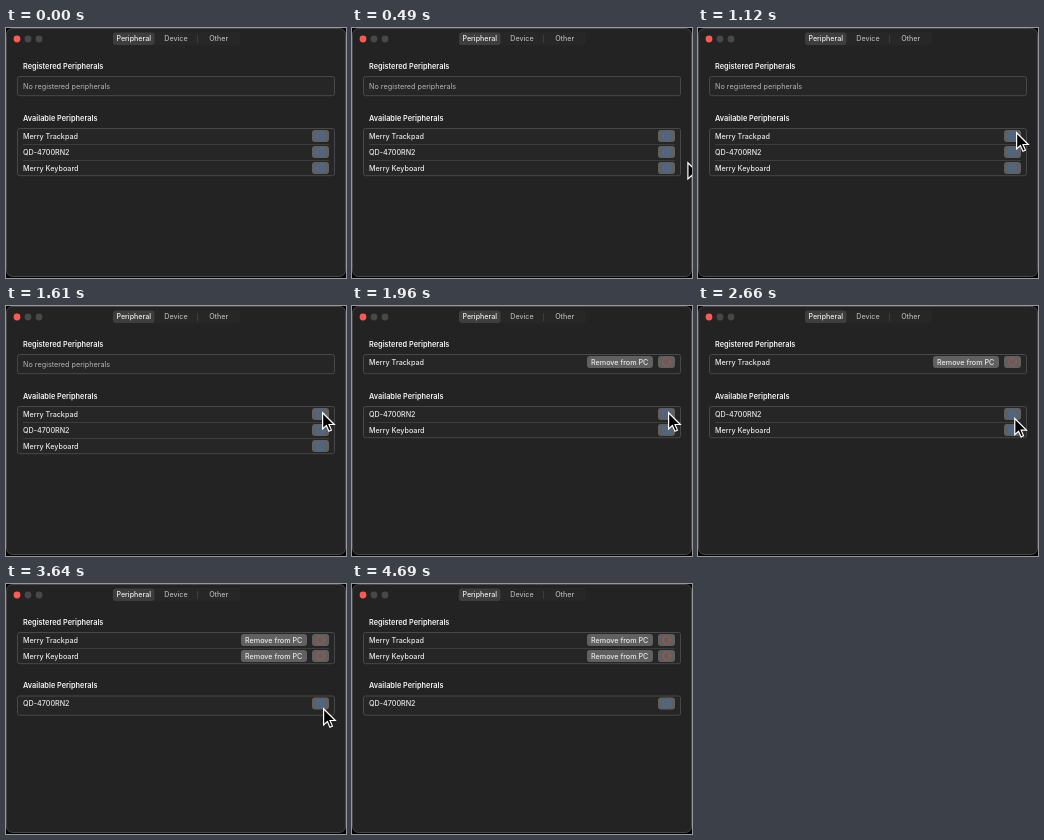
Write an HTML page that moves like this. It is 340 px wide and 250 px high and loops after 5320 ms.

```html
<!DOCTYPE html>
<html lang="en">
<head>
<meta charset="utf-8">
<title>Peripherals</title>
<style>
  html, body { margin: 0; width: 100%; height: 100%; overflow: hidden; background: #000; }
  svg { display: block; width: 340px; height: 250px; }
  text { font: 500 7.2px Inter, "Open Sans", sans-serif; fill: #e8e8e8; }
  .head { font-size: 7.35px; font-weight: 600; fill: #f4f4f4; }
  .dim { font-size: 7.25px; font-weight: 400; fill: #b4b4b4; }
  .tab { font-size: 7.1px; fill: #b4b4b4; text-anchor: middle; }
  .box { fill: #262626; stroke: #484848; }
  .line { stroke: #3d3d3d; }
  .button { fill: #606060; }
  .pressed { fill: #858585; }
</style>
</head>
<body>
<svg viewBox="0 0 340 250">
  <rect x=".5" y=".5" width="339" height="248" rx="6" fill="#232323" stroke="#484848"/>
  <circle cx="11" cy="11" r="3.4" fill="#fb5b51"/>
  <circle cx="22" cy="11" r="3.4" fill="#484848"/>
  <circle cx="33" cy="11" r="3.4" fill="#484848"/>
  <rect x="106.5" y="4" width="127.5" height="13.5" rx="3.5" fill="#272727"/>
  <rect x="107" y="4.5" width="41.5" height="12.5" rx="3" fill="#3e3e3e"/>
  <path d="M191.5 7v8" class="line"/>
  <text x="127.7" y="13.3" class="tab" style="fill:#eee">Peripheral</text>
  <text x="170" y="13.3" class="tab">Device</text>
  <text x="212.7" y="13.3" class="tab">Other</text>
  <g id="lists"></g>
  <path id="cursor" d="M.6.8V17L4.4 13.5 6.9 19.2 9.4 18.1 7 12.5H12.3Z" fill="#000" stroke="#fff" stroke-width="1.2"/>
</svg>
<script>
const LOOP = 5320, STEP = 70, ROW = 16;
const pad = 'Merry Trackpad', phones = 'QD-4700RN2', keys = 'Merry Keyboard';
const lists = document.getElementById('lists');
const cursor = document.getElementById('cursor');

// time, x, y of the pointer tip
const path = [
  [210, 341, 170], [280, 338, 162], [490, 335.3, 134], [560, 335, 132.5],
  [630, 335, 132.5], [1120, 318, 104], [1190, 316, 104], [1260, 315, 104.5],
  [1470, 315, 104.5], [1610, 316, 106], [2450, 316, 106], [3010, 316.5, 124],
  [3080, 317, 124], [4550, 317, 124], [4620, 319, 66.5], [4690, 319, 66.5]
];

const text = (x, y, s, cls = '') => `<text x="${x}" y="${y + 2.6}" class="${cls}">${s}</text>`;
const button = (x, y, w, cls = '') =>
  `<rect x="${x}" y="${y - 6}" width="${w}" height="12" rx="3" class="button ${cls}"/>`;

function icon(y, registered, pressed) {
  const mark = registered
    ? '<circle r="3.8" stroke="#d4483f" stroke-dasharray="2.2 .8"/>'
    : '<circle r="3.7" stroke="#2c74cc"/><path d="M-1.6 0h3.2M0-1.6v3.2" stroke="#476f9c" stroke-width=".7"/>';
  return button(306, y, 17, pressed ? 'pressed' : '') +
    `<g transform="translate(314.5 ${y})" fill="none" stroke-width="1">${mark}</g>`;
}

function list(title, top, items, registered, pressed) {
  const h = Math.max(20, items.length * ROW) - .8;
  let out = text(17, top - 10, title, 'head') +
    `<rect x="11.5" y="${top + .5}" width="317" height="${h}" rx="2" class="box"/>`;
  if (!items.length) out += text(17, top + 10.5, 'No registered peripherals', 'dim');
  items.forEach((name, i) => {
    const y = top + 8 + i * ROW;
    if (i) out += `<path d="M17 ${y - 7.5}H323" class="line"/>`;
    out += text(17, y, name) + icon(y, registered, i === pressed);
    if (registered) out += button(235, y, 66) + text(239, y, 'Remove from PC');
  });
  return out;
}

function drawLists(t) {
  const own = t < 1890 ? [] : t < 3640 ? [pad] : [pad, keys];
  const free = [pad, phones, keys].filter(n => !own.includes(n));
  const pressed = t >= 1750 && t < 1890 ? 0 : t >= 3500 && t < 3640 ? 1 : -1;
  const top = own.length > 1 ? 111.5 : 100;
  return list('Registered Peripherals', 48, own, true, -1) +
    list('Available Peripherals', top, free, false, pressed);
}

function moveCursor(t) {
  const i = path.findIndex(p => p[0] > t);
  cursor.style.display = i > 0 ? '' : 'none';
  if (i < 1) return;
  const [t0, x0, y0] = path[i - 1], [t1, x1, y1] = path[i];
  const u = (t - t0) / (t1 - t0), k = u * u * (3 - 2 * u);
  cursor.setAttribute('transform', `translate(${x0 + (x1 - x0) * k} ${y0 + (y1 - y0) * k})`);
}

let shown = '';
function frame() {
  const t = Math.floor(performance.now() % LOOP / STEP) * STEP;
  const html = drawLists(t);
  if (html !== shown) lists.innerHTML = shown = html;
  moveCursor(t);
  requestAnimationFrame(frame);
}
frame();
</script>
</body>
</html>
```
